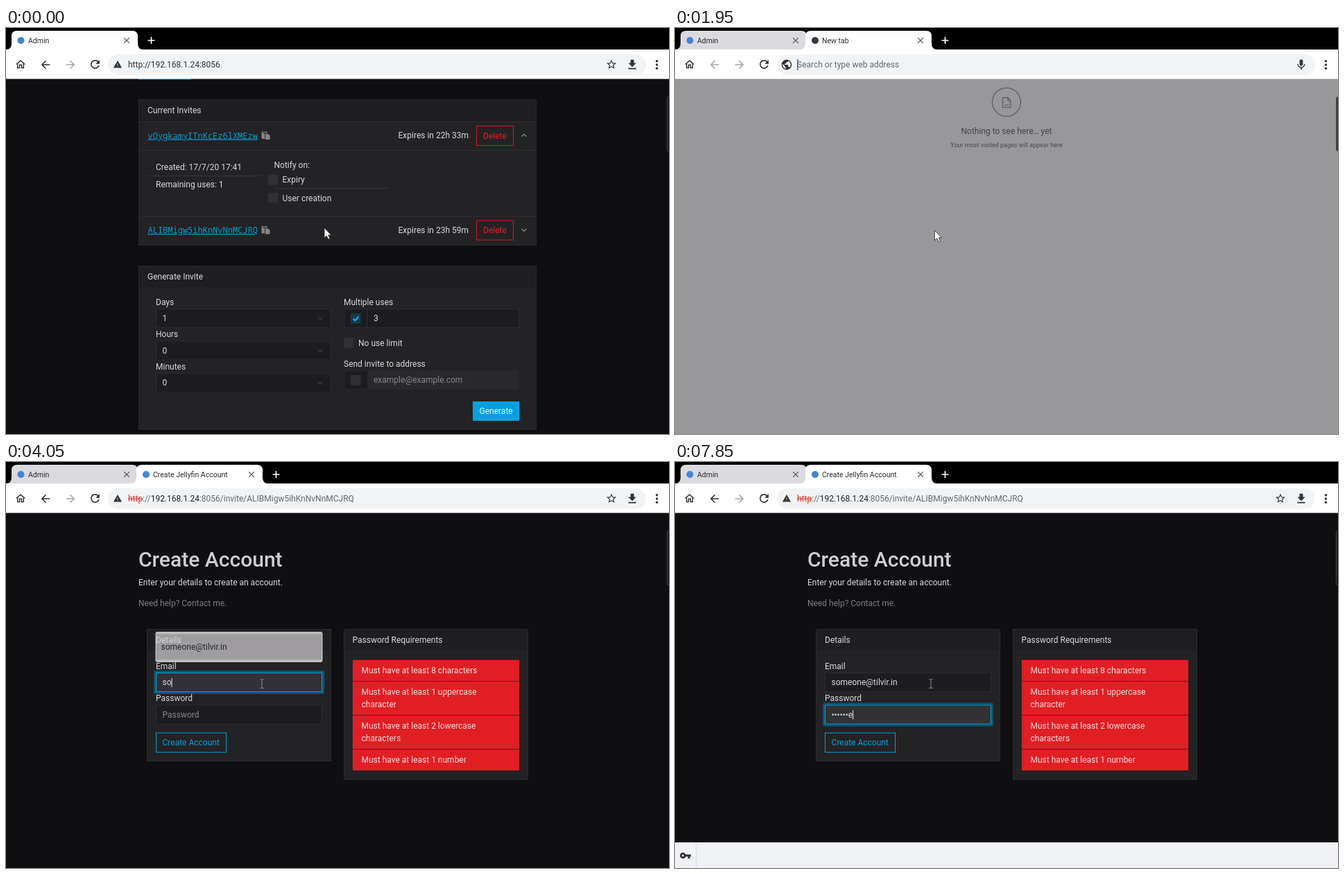
An HTML page that plays this animation: 956 px wide and 586 px high, repeating every 8 s.

```html
<!DOCTYPE html>
<html lang="en">
<head>
<meta charset="utf-8">
<title>Invite sign-up</title>
<style>
html, body { margin: 0; width: 100%; height: 100%; overflow: hidden; background: #000; }
svg { display: block; width: 100vw; height: 100vh; }
text { font: 12px Roboto, sans-serif; white-space: pre; }
.mono { font: 12px "Noto Sans Mono", monospace; text-decoration: underline; }
.tab { font-size: 10.5px; }
.head { font-size: 30px; font-weight: 500; }
.small { font-size: 9px; }
</style>
</head>
<body>
<svg id="stage" viewBox="0 0 956 586"></svg>
<script>
const LOOP = 8000, EMAIL = 'someone@tilvir.in', PASSWORD = 'welcome';
const OPEN = 1550, NEW_TAB = 1600, PASTE = 2250, LOADED = 2650, TYPE = 3950, TO_PASSWORD = 5800;
const INK = '#d9d8da', DARK = '#303135', BLUE = '#0a9dd3', RED = '#e21e25', MUTED = '#88878a';

// Markup helpers
const text = (x, y, s, fill = INK, cls = '', more = '') =>
  `<text x="${x}" y="${y}" fill="${fill}" class="${cls}" ${more}>${s}</text>`;
const rect = (x, y, w, h, fill, stroke = 'none', more = '') =>
  `<rect x="${x}" y="${y}" width="${w}" height="${h}" fill="${fill}" stroke="${stroke}" ${more}/>`;
const line = (d, stroke, width = 1, more = '') =>
  `<path d="${d}" fill="none" stroke="${stroke}" stroke-width="${width}" ${more}/>`;
const dot = (x, y, r, fill) => `<circle cx="${x}" cy="${y}" r="${r}" fill="${fill}"/>`;
const group = (id, s) => `<g id="${id}">${s}</g>`;
const during = (from, to, s) => `<g data-from="${from}" data-to="${to}">${s}</g>`;

const icons = {
  home: 'M12 5.69l5 4.5V18h-2v-6H9v6H7v-7.81l5-4.5M12 3L2 12h3v8h6v-6h2v6h6v-8h3L12 3z',
  back: 'M20 11H7.83l5.59-5.59L12 4l-8 8 8 8 1.41-1.41L7.83 13H20v-2z',
  next: 'M12 4l-1.41 1.41L16.17 11H4v2h12.17l-5.58 5.59L12 20l8-8z',
  reload: 'M17.65 6.35C16.2 4.9 14.21 4 12 4c-4.42 0-7.99 3.58-7.99 8s3.57 8 7.99 8c3.73 0 6.84-2.55 7.73-6h-2.08c-.82 2.33-3.04 4-5.65 4-3.31 0-6-2.69-6-6s2.69-6 6-6c1.66 0 3.14.69 4.22 1.78L13 11h7V4l-2.35 2.35z',
  close: 'M19 6.41L17.59 5 12 10.59 6.41 5 5 6.41 10.59 12 5 17.59 6.41 19 12 13.41 17.59 19 19 17.59 13.41 12z',
  warn: 'M1 21h22L12 2 1 21zm12-3h-2v-2h2v2zm0-4h-2v-4h2v4z',
  star: 'M22 9.24l-7.19-.62L12 2 9.19 8.63 2 9.24l5.46 4.73L5.82 21 12 17.27 18.18 21l-1.63-7.03L22 9.24zM12 15.4l-3.76 2.27 1-4.28-3.32-2.88 4.38-.38L12 6.1l1.71 4.04 4.38.38-3.32 2.88 1 4.28L12 15.4z',
  load: 'M19 9h-4V3H9v6H5l7 7 7-7zM5 18v2h14v-2H5z',
  info: 'M11 7h2v2h-2zm0 4h2v6h-2zm1-9C6.48 2 2 6.48 2 12s4.48 10 10 10 10-4.48 10-10S17.52 2 12 2zm0 18c-4.41 0-8-3.59-8-8s3.59-8 8-8 8 3.59 8 8-3.59 8-8 8z',
  clear: 'M12 2C6.47 2 2 6.47 2 12s4.47 10 10 10 10-4.47 10-10S17.53 2 12 2zm5 13.59L15.59 17 12 13.41 8.41 17 7 15.59 10.59 12 7 8.41 8.41 7 12 10.59 15.59 7 17 8.41 13.41 12 17 15.59z',
  mic: 'M12 14c1.66 0 3-1.34 3-3V5c0-1.66-1.34-3-3-3S9 3.34 9 5v6c0 1.66 1.34 3 3 3zm5.3-3c0 3-2.54 5.1-5.3 5.1S6.7 14 6.7 11H5c0 3.41 2.72 6.23 6 6.72V21h2v-3.28c3.28-.48 6-3.3 6-6.72h-1.7z',
  globe: 'M12 2C6.48 2 2 6.48 2 12s4.48 10 10 10 10-4.48 10-10S17.52 2 12 2zm-1 17.93c-3.95-.49-7-3.85-7-7.93 0-.62.08-1.21.21-1.79L9 15v1c0 1.1.9 2 2 2v1.93zm6.9-2.54c-.26-.81-1-1.39-1.9-1.39h-1v-3c0-.55-.45-1-1-1H8v-2h2c.55 0 1-.45 1-1V7h2c1.1 0 2-.9 2-2v-.41c2.93 1.19 5 4.06 5 7.41 0 2.08-.8 3.97-2.1 5.39z',
  key: 'M12.65 10C11.83 7.67 9.61 6 7 6c-3.31 0-6 2.69-6 6s2.69 6 6 6c2.61 0 4.83-1.67 5.65-4H17v4h4v-4h2v-4H12.65zM7 14c-1.1 0-2-.9-2-2s.9-2 2-2 2 .9 2 2-.9 2-2 2z'
};
const icon = (name, x, y, k = .72, fill = DARK) =>
  `<path d="${icons[name]}" fill="${fill}" transform="translate(${x} ${y}) scale(${k}) translate(-12 -12)"/>`;

// Shared page parts
const card = (x, y, w, h, title, tx) => rect(x + .5, y + .5, w, h, '#232224', '#2a292b')
  + rect(x + 1, y + 1, w - 1, 31, '#1f1e20') + text(tx, y + 20, title);
const field = (x, y, w) => rect(x + .5, y + .5, w - 1, 27, '#1d1c1e', '#2b2a2c');
const box = (x, y, fill = '#302f31') => rect(x, y, 14.5, 14.5, fill);
const chevron = (x, y, dir, color) => line(`M${x - 3.5} ${y - 1.7 * dir}l3.5 ${3.5 * dir} 3.5 ${-3.5 * dir}`, color, 1.1);
const copyIcon = (y, fill) => rect(368.5, y - 6, 8, 10.5, fill, 'none', 'rx="1"')
  + rect(370.5, y - 5, 4, 1.4, '#232224')
  + `<path d="M373.5 ${y - 3}h4.5l3 3v6h-7.5z" fill="${fill}" stroke="#232224" stroke-width=".9"/>`;
const invite = (y, code, left, dir) => text(204.5, y + 4, code, BLUE, 'mono') + copyIcon(y, '#858487')
  + text(565.5, y + 3.5, `Expires in ${left}`) + rect(678.5, y - 14, 53, 28, 'none', '#c81d24')
  + text(688, y + 4, 'Delete', RED) + chevron(747, y - .5, dir, '#a09fa2');
const select = (y, label, value) => text(216, y - 5.5, label) + field(216, y, 253)
  + text(225.5, y + 18, value) + chevron(453, y + 14, 1, '#464548');

const adminPage = rect(0, 73, 956, 513, '#0f0e11') + rect(191, 73, 76, 1.5, '#087fa9')
  + card(191, 103, 573, 210, 'Current Invites', 204)
  + line('M192 135.5H764M192 176.5H764M192 271.5H764', '#302f32')
  + invite(155.5, 'vQygkamyITnKcEz6lXMEzw', '22h 33m', -1)
  + invite(292, 'ALIBMigw5ihKnNvNnMCJRQ', '23h 59m', 1)
  + during(950, OPEN + 50, copyIcon(292, '#e6e6e8'))
  + text(216, 205, 'Created: 17/7/20 17:41') + text(216, 230, 'Remaining uses: 1')
  + text(386.5, 202, 'Notify on:') + text(398.5, 223, 'Expiry') + text(398.5, 249.5, 'User creation')
  + line('M205 213.5H367M387 231.5H551', '#363538') + box(377.5, 212) + box(377.5, 238)
  + card(191, 343, 573, 236, 'Generate Invite', 204)
  + select(405, 'Days', '1') + select(451.5, 'Hours', '0') + select(498, 'Minutes', '0')
  + text(487, 399.5, 'Multiple uses') + field(487, 405, 253) + line('M520.5 405V433', '#2e2d2f')
  + box(497, 412, '#163b4b') + line('M500.5 419.5l2.7 2.8 5.3-5.8', '#0cb3f2', 2) + text(530, 423, '3')
  + box(487, 447) + text(508, 458.5, 'No use limit') + text(487, 488.5, 'Send invite to address')
  + field(487, 494, 253) + rect(521, 494.5, 219, 27, '#29282a') + box(497, 501)
  + text(530, 512, 'example@example.com', MUTED)
  + rect(673, 539, 67, 28, '#02a1de') + text(682.5, 557, 'Generate', '#eaf6fb');

const newTabPage = `<g fill="none" stroke="#666467" stroke-width="1.4"><circle cx="478" cy="107" r="20.5"/>`
  + `<path d="M472.5 100.5h7.5l4 4v10h-11.5zM480 100.5v4h4M475.5 106v1M481 106v1M475.5 111q3 1.5 6-1"/></g>`
  + text(478, 153, 'Nothing to see here… yet', '#454447', '', 'text-anchor="middle"')
  + text(478, 172, 'Your most visited pages will appear here', '#4b4a4d', 'small', 'text-anchor="middle"');

const rules = [[286, 30, 'Must have at least 8 characters'],
  [317, 48, 'Must have at least 1 uppercase', 'character'],
  [366, 48, 'Must have at least 2 lowercase', 'characters'],
  [415, 30, 'Must have at least 1 number']];
const focusRing = (id, y) => group(id, rect(214.5, y - 1.5, 243, 31, 'none', '#0c5470', 'stroke-width="3" rx="1"')
  + rect(216.5, y + .5, 239, 27, '#323134', '#06a0d8'));
const input = (id, y, hint) => text(216, y - 5.5, hint) + field(216, y, 240) + focusRing(id + 'Ring', y)
  + text(225.5, y + 18, '', INK, '', `id="${id}"`) + rect(0, y + 8, 1, 13, '#e8e8ea', 'none', `id="${id}Caret"`);

const signUpPage = rect(0, 73, 956, 513, '#0f0e11')
  + text(191, 150.5, 'Create Account', '#cfced0', 'head')
  + text(191, 177.5, 'Enter your details to create an account.')
  + text(191, 207.5, 'Need help? Contact me.', '#7d7c7f')
  + card(203, 241, 265, 190, 'Details', 216) + card(487, 241, 265, 217, 'Password Requirements', 499.5)
  + line('M204 273.5H468M488 273.5H752', '#282729')
  + input('email', 304, 'Email') + input('pass', 350.5, 'Password')
  + rect(216.5, 391, 101, 28, 'none', BLUE) + text(225.5, 409, 'Create Account', BLUE)
  + rect(499.5, 285.5, 241, 160, '#661a1e')
  + rules.map(([y, h, ...rows]) => rect(500, y, 240, h, RED)
    + rows.map((s, i) => text(512.5, y + 19 + 18 * i, s, '#f3dfe0')).join('')).join('')
  + group('suggest', rect(215.5, 245, 241, 44, '#fff', 'none', 'rx="3"') + rect(217, 248.5, 238, 37, '#d2d0d3')
    + text(223.5, 271, EMAIL, '#29282b'))
  + group('keyBar', rect(0, 549, 956, 37, '#f1f2f6') + line('M30.5 549V586', '#d9dae0') + icon('key', 15, 568, .72));

// Browser frame
const tabShape = (x, w, fill) => `<path d="M${x - 8} 31Q${x} 31 ${x} 22V12Q${x} 4 ${x + 8} 4H${x + w - 8}Q${x + w} 4 ${x + w} 12V22Q${x + w} 31 ${x + w + 8} 31z" fill="${fill}"/>`;
const tabClose = x => icon('close', x, 18, .6, '#55565a');
const path = ':8056/invite/ALIBMigw5ihKnNvNnMCJRQ';
const url = scheme => text(176, 57, `${scheme}<tspan fill="#202124">192.168.1.24</tspan>${path}`, '#67696d');
const pageTools = icon('star', 873, 52.5, .7) + icon('load', 903, 53, .8);
const blueDot = x => dot(x, 18, 5, '#4384d8');

const tabs = rect(0, 0, 956, 31, '#000')
  + during(0, OPEN, tabShape(8, 182, '#fff')) + during(OPEN, LOOP, tabShape(8, 182, '#dbdade'))
  + blueDot(21.5) + text(32, 22, 'Admin', '#28292c', 'tab') + tabClose(174)
  + group('tab2', tabShape(188, 182, '#fff')
    + during(0, PASTE + 50, dot(202, 18, 5, '#38393c'))
    + during(PASTE + 50, LOADED, group('spin', line('M0 -4.7A4.7 4.7 0 0 1 -1.5 4.5', '#4b88e0', 1.6)))
    + during(LOADED, LOOP, blueDot(202))
    + during(0, LOADED, text(212, 22, 'New tab', '#28292c', 'tab'))
    + during(LOADED, LOOP, text(212, 22, 'Create Jellyfin Account', '#28292c', 'tab')) + tabClose(354))
  + group('plus', line('M-5 18H5M0 13V23', '#fff', 1.7));

const toolbar = rect(0, 31, 956, 42.5, '#fff') + rect(147, 38, 776, 30, '#f1f3f5', 'none', 'rx="15"')
  + icon('home', 21, 52.5) + icon('next', 93, 53, .78, '#a5a6a9')
  + during(0, NEW_TAB, icon('back', 57, 53, .78)) + during(NEW_TAB, PASTE, icon('back', 57, 53, .78, '#a5a6a9'))
  + during(PASTE, LOOP, icon('back', 57, 53, .78))
  + during(0, PASTE + 50, icon('reload', 128.5, 52.5, .8)) + during(PASTE + 50, LOADED, icon('close', 128.5, 53, .75))
  + during(LOADED, LOOP, icon('reload', 128.5, 52.5, .8))
  + [47.8, 53, 58.2].map(y => dot(938.5, y, 1.7, DARK)).join('')
  + during(0, NEW_TAB, icon('warn', 161, 52.5, .55) + text(176, 57, 'http://192.168.1.24:8056', '#303135') + pageTools)
  + during(NEW_TAB, PASTE, icon('globe', 161, 53, .73) + text(176, 57, 'Search or type web address', '#686a6e')
    + rect(176, 45, 1.5, 16, '#3572c8') + icon('mic', 903, 53, .78))
  + during(PASTE, LOADED, icon('info', 161, 53, .7) + url('http://') + icon('clear', 873, 53, .76) + icon('mic', 903, 53, .78))
  + during(LOADED, TYPE, icon('info', 161, 53, .7) + url('http://') + pageTools)
  + during(TYPE, LOOP, icon('warn', 161, 52.5, .55)
    + url('<tspan fill="#d8352b" text-decoration="line-through">http</tspan>://') + pageTools)
  + rect(0, 71.5, 0, 2.3, '#3a78cb', 'none', 'id="progress"');

const sideHandle = rect(953.5, 99.5, 8, 78, 'rgba(22,22,25,.72)', '#4a494d', 'rx="2"');
const arrow = '<path d="M0 0V14.3L3.3 11.4 5.7 16.4 8 15.4 5.7 10.4H10z" fill="#fff" stroke="#29282b" stroke-width=".8"/>';
const beam = line('M-2.8 -6.5Q0 -6.5 0 -5V5Q0 6.5 -2.8 6.5M2.8 -6.5Q0 -6.5 0 -5M0 5Q0 6.5 2.8 6.5', '#858487', 1.1);

stage.innerHTML = during(0, NEW_TAB, adminPage)
  + during(NEW_TAB, LOADED, rect(0, 73, 956, 513, '#fff', 'none', 'id="blank"'))
  + during(NEW_TAB + 50, PASTE, newTabPage) + during(LOADED, LOOP, signUpPage)
  + sideHandle + tabs + toolbar
  + group('pointer', during(0, 3250, arrow) + during(3250, LOOP, beam));

// Motion
const el = id => document.getElementById(id);
const timed = [...document.querySelectorAll('[data-from]')];
const set = (id, name, value) => el(id).setAttribute(name, value);
const clamp = v => Math.max(0, Math.min(1, v));
const ramp = (t, a, b) => clamp((t - a) / (b - a));
const smooth = v => v * v * (3 - 2 * v);
function track(t, keys, ease = v => v) {
  let i = 1;
  while (i < keys.length - 1 && t > keys[i][0]) i++;
  const [a, ...p] = keys[i - 1], [b, ...q] = keys[i], k = ease(ramp(t, a, b));
  return p.map((v, j) => v + (q[j] - v) * k);
}
const typed = (t, start, step, length) => Math.max(0, Math.min(length, Math.floor((t - start) / step) + 1));

function fill(id, value, hint, focused) {
  const node = el(id);
  node.textContent = value || hint;
  node.setAttribute('fill', value ? INK : MUTED);
  set(id + 'Caret', 'x', 225.5 + (value ? node.getComputedTextLength() : 0));
  set(id + 'Caret', 'opacity', +focused);
}

function draw(t) {
  for (const g of timed) g.style.display = t >= +g.dataset.from && t < +g.dataset.to ? '' : 'none';

  const [x, y] = track(t, [[30, 459, 288.5], [1050, 374.5, 291.5], [2500, 374.5, 292.5],
    [3250, 370, 319], [3450, 370, 320], [3700, 369, 320]], smooth);
  set('pointer', 'transform', `translate(${x} ${y})`);

  const opened = smooth(ramp(t, OPEN - 30, OPEN + 150));
  set('tab2', 'transform', `translate(0 ${28 * (1 - opened)})`);
  set('tab2', 'opacity', +(opened > 0));
  set('plus', 'transform', `translate(${209.5 + 180 * opened} 0)`);
  set('spin', 'transform', `translate(202 18) rotate(${(t - 2400) * .5})`);

  const [shade] = track(t, [[NEW_TAB, 250], [1850, 152], [2350, 152], [2400, 114], [2550, 15]]);
  set('blank', 'fill', `rgb(${shade},${shade - 1},${shade + 1})`);
  set('progress', 'width', track(t, [[2300, 0], [2400, 765], [2600, 956]])[0]);
  set('progress', 'opacity', 1 - ramp(t, LOADED, LOADED + 150));

  const inEmail = t >= 3650 && t < TO_PASSWORD, inPass = t >= TO_PASSWORD;
  fill('email', EMAIL.slice(0, typed(t, TYPE, 95, EMAIL.length)), 'Email', inEmail);
  const n = typed(t, 7050, 133, PASSWORD.length);
  fill('pass', n ? '•'.repeat(n - 1) + PASSWORD[n - 1] : '', 'Password', inPass);
  set('emailRing', 'opacity', ramp(t, 3650, 3800) - ramp(t, TO_PASSWORD, TO_PASSWORD + 150));
  set('passRing', 'opacity', ramp(t, TO_PASSWORD, TO_PASSWORD + 150));
  set('suggest', 'opacity', ramp(t, 3980, 4080) - ramp(t, 5750, 5850));
  set('keyBar', 'transform', `translate(0 ${38 * (1 - smooth(ramp(t, 5800, 6000)))})`);
}

const start = performance.now();
(function tick() {
  draw((performance.now() - start) % LOOP);
  requestAnimationFrame(tick);
})();
</script>
</body>
</html>
```
